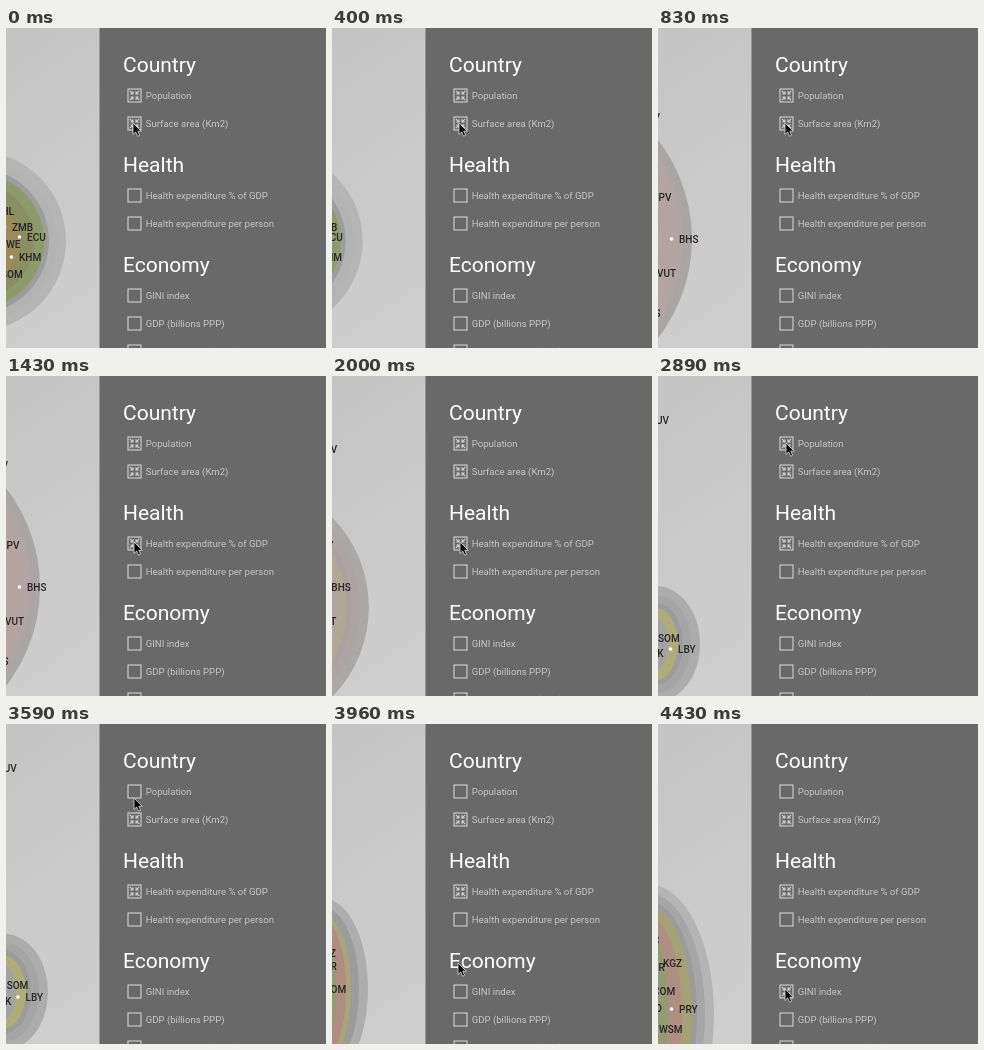
Animation of 320 by 320 pixels, one loop 4530 ms. Source, as an HTML page:

```html
<!DOCTYPE html>
<html lang="en">
<head>
<meta charset="utf-8">
<title>Indicator picker</title>
<style>
  html, body { margin: 0; width: 100%; height: 100%; overflow: hidden; background: #696969; }
  svg { display: block; width: 100vw; height: 100vh; font-family: Roboto, Arial, sans-serif; }
  .heading { font-size: 21px; fill: #fff; }
  .option { font-size: 9.6px; fill: #c6c6c6; }
  .code { font-size: 10px; font-weight: 500; fill: #262626; }
  .box { fill: none; stroke: #d2d2d2; stroke-width: 1.1; }
</style>
</head>
<body>
<svg id="stage" viewBox="0 0 320 320">
  <defs>
    <linearGradient id="wall" x1="0" y1="0" x2="0.2" y2="1">
      <stop offset="0" stop-color="#c4c4c4"/>
      <stop offset="1" stop-color="#cecece"/>
    </linearGradient>
  </defs>
  <rect width="94" height="320" fill="url(#wall)"/>
  <g id="chart"></g>
  <rect x="93.5" width="227" height="320" fill="#696969"/>
  <g id="panel"></g>
  <path id="cursor" d="M0 0V11.5L2.7 9L4.6 13.2L6.6 12.3L4.8 8.2H8.3Z" fill="#080808" stroke="#ddd" stroke-width=".8"/>
</svg>
<script>
const LOOP = 4530;
const $ = id => document.getElementById(id);

function add(parent, tag, attrs, text) {
  const el = document.createElementNS('http://www.w3.org/2000/svg', tag);
  for (const key in attrs) el.setAttribute(key, attrs[key]);
  if (text) el.textContent = text;
  parent.appendChild(el);
  return el;
}

// Each shape is an ellipse [cx, cy, rx, ry]; its bands run from the rim inwards.
const insets = [0, 9, 17, 22, 32, 46];
const shapes = {
  wide:    { ellipse: [-30, 213, 90, 90],    bands: ['b5b5b5', 'b3b3b3', '9d9d9d', '8c9a6c', '8b8d62', '9b8a5a'] },
  hidden:  { ellipse: [-92, 213, 90, 90],    bands: ['b5b5b5', 'b3b3b3', '9d9d9d', '8c9a6c', '8b8d62', '9b8a5a'] },
  tall:    { ellipse: [-127, 211, 161, 161], bands: ['aaa6a5', 'b2a5a4', 'b4a5a3', 'b3a4a2', 'b4a5a3', 'b4a5a3'] },
  small:   { ellipse: [-2, 268, 44, 58],     bands: ['acacac', 'a5a5a5', '9b9b9b', 'b0ab7a', 'a2a2a0', '9c9c98'] },
  small2:  { ellipse: [-2, 268, 44, 58],     bands: ['acacac', 'a5a5a5', '9b9b9b', 'b0ab7a', 'a2a2a0', '9c9c98'] },
  narrow:  { ellipse: [-8, 265, 44, 90],     bands: ['adadad', '9b9b9b', 'a8a57c', 'b08d80', '929b72', 'b08a72'] },
  big:     { ellipse: [-10, 290, 66, 130],   bands: ['b4b4b4', 'a6a6a6', '9b9b9b', 'a6a076', 'ae9080', '929b74'] }
};

// Start point of each country code in the shapes that show it.
const codes = {
  PHL: { wide: [-11, 183] },
  ZMB: { wide: [6, 199] },
  ECU: { wide: [21, 209] },
  ZWE: { wide: [-6, 216] },
  KHM: { wide: [13, 229] },
  SOM: { wide: [-5, 246], small: [0, 262], small2: [1, 262] },
  TUV: { tall: [-17, 89], small: [-8, 44], small2: [-8, 44] },
  CPV: { tall: [-6, 169] },
  BHS: { tall: [21, 211] },
  VUT: { tall: [-1, 245] },
  TLS: { tall: [-15, 285] },
  LBY: { small: [20, 273], small2: [20, 273] },
  PAK: { small: [-13, 277], small2: [-13, 277] },
  GNB: { small: [-19, 291] },
  KGZ: { narrow: [-15, 229], big: [5, 239] },
  MMR: { narrow: [-19, 242], big: [-17, 243] },
  COM: { narrow: [-8, 265], big: [-5, 267] },
  NIC: { big: [-15, 216] },
  LAO: { big: [-15, 284] },
  PRY: { big: [21, 285] },
  WSM: { big: [1, 305] }
};

// [time, value] keys, eased between neighbours.
const shapeKeys = [[0, 'wide'], [160, 'wide'], [660, 'hidden'], [700, 'hidden'], [820, 'tall'],
  [1800, 'tall'], [2300, 'small'], [2860, 'small'], [3160, 'small2'], [3570, 'small2'],
  [3950, 'narrow'], [4000, 'narrow'], [4420, 'big'], [LOOP, 'big']];
const cursorKeys = [[0, [127, 95]], [840, [127, 95]], [1200, [128, 166]], [2310, [128, 166]],
  [2400, [128, 180]], [2830, [128, 67]], [3000, [128, 67]], [3160, [128, 74]], [3600, [128, 74]],
  [3960, [126, 239]], [4130, [127, 265]], [LOOP, [127, 265]]];

const headings = [['Country', 44], ['Health', 144], ['Economy', 244]];
const options = [
  ['Population', 67, t => t < 2900],
  ['Surface area (Km2)', 95, () => true],
  ['Health expenditure % of GDP', 167, t => t >= 1260],
  ['Health expenditure per person', 195, () => false],
  ['GINI index', 267, t => t >= 4150],
  ['GDP (billions PPP)', 295, () => false],
  ['GDP per capita (PPP)', 323, () => false]
];

const bands = insets.map(() => add($('chart'), 'ellipse', {}));
const tags = Object.entries(codes).map(([name, spots]) => {
  const el = add($('chart'), 'g', {});
  add(el, 'circle', { cx: -7.5, r: 1.8, fill: '#fff' });
  add(el, 'text', { class: 'code', y: 3.6 }, name);
  return { el, spots, rest: [-40, Object.values(spots)[0][1]] };
});

headings.forEach(([name, y]) => add($('panel'), 'text', { class: 'heading', x: 117, y }, name));
const arm = 'M1.5 4.2V1.5H4.2M1.5 1.5L4.7 4.7';
const marks = options.map(([name, y, isOn]) => {
  const row = add($('panel'), 'g', { class: 'box', transform: `translate(128.5 ${y + .5})` });
  add(row, 'rect', { x: -6.5, y: -6.5, width: 13, height: 13 });
  const mark = add(row, 'g', {});
  for (let k = 0; k < 4; k++) add(mark, 'path', { d: arm, transform: `rotate(${k * 90})` });
  add($('panel'), 'text', { class: 'option', x: 139.7, y: y + 4 }, name);
  return { mark, isOn };
});

const mix = (a, b, p) => a.map((v, i) => v + (b[i] - v) * p);
const rgb = hex => [0, 2, 4].map(i => parseInt(hex.substr(i, 2), 16));
const ease = p => p * p * (3 - 2 * p);

function between(keys, t) {
  let i = 1;
  while (i < keys.length - 1 && t >= keys[i][0]) i++;
  const [t0, from] = keys[i - 1], [t1, to] = keys[i];
  return { from, to, p: ease((t - t0) / (t1 - t0)) };
}

function draw(t) {
  const { from, to, p } = between(shapeKeys, t);
  const a = shapes[from], b = shapes[to];
  const [cx, cy, rx, ry] = mix(a.ellipse, b.ellipse, p);
  bands.forEach((el, i) => {
    el.setAttribute('cx', cx);
    el.setAttribute('cy', cy);
    el.setAttribute('rx', Math.max(0, rx - insets[i]));
    el.setAttribute('ry', Math.max(0, ry - insets[i]));
    el.setAttribute('fill', `rgb(${mix(rgb(a.bands[i]), rgb(b.bands[i]), p).map(Math.round)})`);
  });
  tags.forEach(({ el, spots, rest }) => {
    const spot = mix(spots[from] || rest, spots[to] || rest, p);
    el.setAttribute('transform', `translate(${spot})`);
  });
  marks.forEach(({ mark, isOn }) => mark.setAttribute('visibility', isOn(t) ? 'visible' : 'hidden'));
  const move = between(cursorKeys, t);
  $('cursor').setAttribute('transform', `translate(${mix(move.from, move.to, move.p)})`);
}

const start = performance.now();
function tick() {
  draw((performance.now() - start) % LOOP);
  requestAnimationFrame(tick);
}
tick();
</script>
</body>
</html>
```
